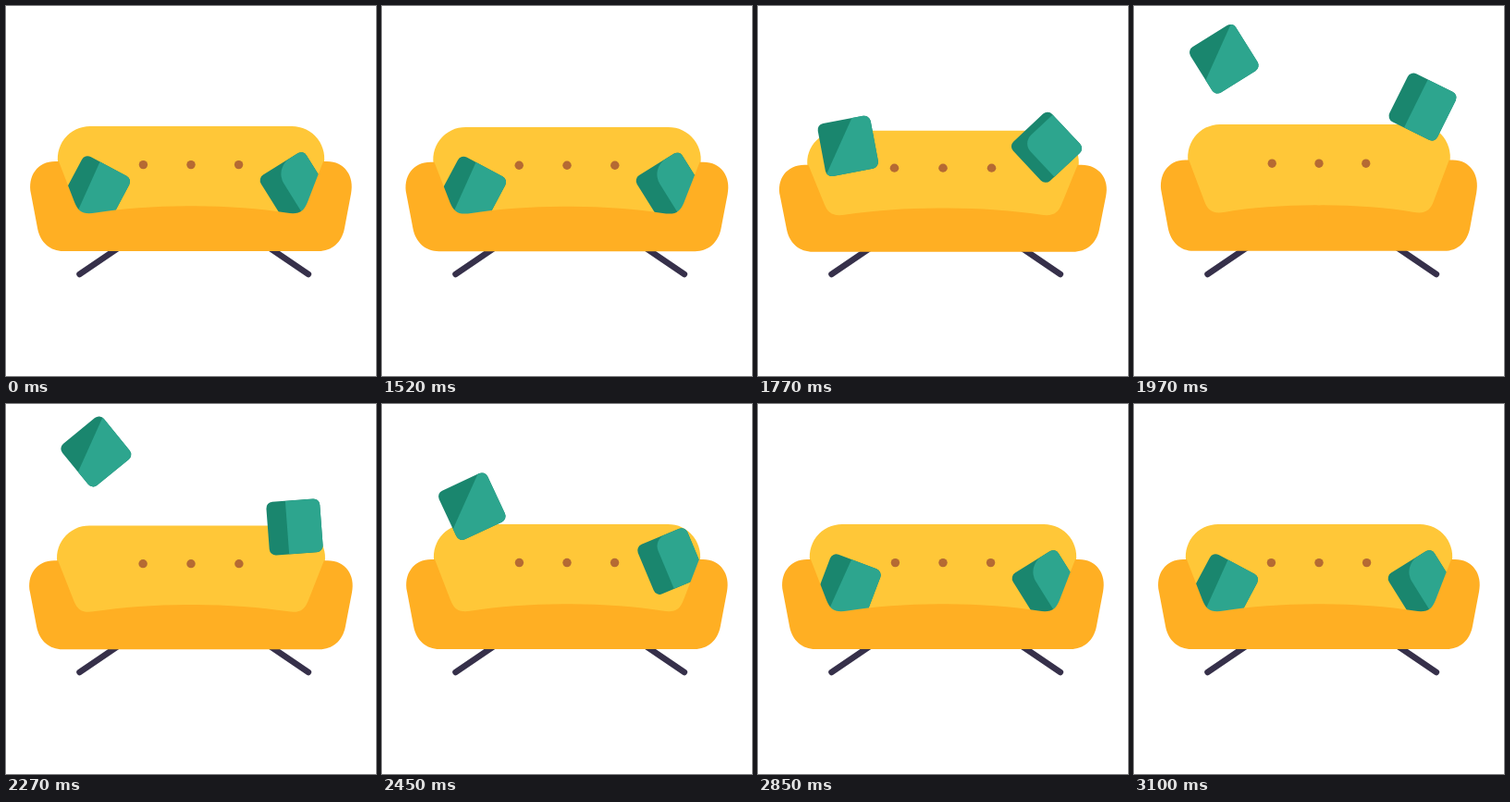
Animation, 400 px wide and 400 px high, one loop 3120 ms. Source, as an HTML page with a canvas:

```html
<!DOCTYPE html>
<html lang="en">
<head>
<meta charset="utf-8">
<title>Bouncing sofa</title>
<style>
  html, body { margin: 0; width: 100%; height: 100%; overflow: hidden; background: #fff; }
  canvas { display: block; width: 100vmin; height: 100vmin; }
</style>
</head>
<body>
<canvas id="stage" width="400" height="400"></canvas>
<script>
const LOOP = 3120, START = 1506, HOLD = 1520, SIDE = 58, HALF = SIDE / 2;
const ctx = document.getElementById('stage').getContext('2d');

const COLOR = {
  back: '#ffc738', body: '#ffaf23', button: '#b56a33',
  leg: '#36304a', light: '#2da58e', dark: '#1a866e'
};

// Left halves, mirrored to make the whole.
const backHalf = new Path2D('M200 130H91A35 35 0 0 0 57 174L80 232H200Z');
const bodyHalf = new Path2D(
  'M57 168H53C34 168 23 184 27 203L34 240C37 256 48 265 62 265' +
  'H200V216.3C165 216 125 219 97 223.5C83 226 78 222 74 212Z');
const leg = new Path2D('M79.5 290L134 253');

const clamp = f => Math.min(1, Math.max(0, f));
const ramp = (t, from, to) => clamp((t - from) / (to - from));

// Squash of the sofa: 1 is fully pressed, negative is stretched.
function squash(t) {
  const press = 1700, settle = 2560;
  if (t < press) return Math.sin(ramp(t, START, press) * Math.PI / 2);
  return Math.cos(Math.PI * (t - press) / 285) * (1 - ramp(t, press, settle)) ** 1.5;
}

// Height above the seat, 0 to 1.
function hop(t, launch, apex, land, power) {
  return 1 - (1 - ramp(t, launch, apex)) ** 3 - ramp(t, apex, land) ** power;
}

function mirrored(axis, draw) {
  draw();
  ctx.save();
  ctx.transform(-1, 0, 0, 1, 2 * axis, 0);
  draw();
  ctx.restore();
}

function fillBoth(path, color) {
  ctx.fillStyle = color;
  mirrored(200, () => ctx.fill(path));
}

function withSofa(q, draw) {
  ctx.save();
  ctx.translate(200, 290);
  ctx.scale(1 + 0.029 * q, 1 - 0.035 * q - 0.013 * Math.abs(q));
  ctx.translate(-200, -290);
  draw();
  ctx.restore();
}

function cushion(x, y, turn, shade) {
  const angle = turn * Math.PI / 180;
  ctx.save();
  ctx.translate(x, y);
  ctx.rotate(angle);
  ctx.beginPath();
  ctx.roundRect(-HALF, -HALF, SIDE, SIDE, 7);
  ctx.fillStyle = COLOR.dark;
  ctx.fill();
  ctx.clip();
  ctx.fillStyle = COLOR.light;
  ctx.beginPath();
  shade(angle);
  ctx.fill();
  ctx.restore();
}

// Rolls upright, jumps, then flops back; it sits higher when upright.
function leftCushion(t, sink) {
  const roll = 1 - (1 - ramp(t, 1550, 2200)) ** 2;
  const fall = ramp(t, 2200, 2540) ** 2;
  const flop = 1 - (1 - ramp(t, 2540, 3080)) ** 2;
  const turn = 28 - 68.5 * roll + 28.5 * fall + 40 * flop;
  const lift = 7.5 * clamp((28 - turn) / 40);
  const y = 199 + sink - lift - 145 * hop(t, 1724, 2150, 2545, 3);

  // The shading edge keeps its direction while the cushion turns.
  cushion(97.3, y, turn, angle => {
    ctx.rotate(-angle);
    ctx.moveTo(13, -50);
    ctx.lineTo(80, -50);
    ctx.lineTo(80, 50);
    ctx.lineTo(-32, 50);
  });
}

// Makes a steady quarter turn in the air.
function rightCushion(t, sink) {
  const turn = 58 - 90 * ramp(t, 1662, 2542);
  const y = 195.5 + sink - 86.5 * hop(t, 1712, 1982, 2540, 2);

  // The dark band moves from the bottom side to the left one.
  cushion(312, y, turn, () => {
    const band = 21, rise = ramp(turn, 28, 58), drop = ramp(turn, -4, -32);
    ctx.roundRect(band * (1 - rise) - HALF, -HALF, 80, SIDE - band * rise,
      [20 * drop, 0, 0, 20 * rise]);
  });
}

function draw(t) {
  const q = squash(t), sink = 4 * Math.max(0, q);
  ctx.fillStyle = '#fff';
  ctx.fillRect(0, 0, 400, 400);

  ctx.strokeStyle = COLOR.leg;
  ctx.lineWidth = 6.5;
  ctx.lineCap = 'round';
  mirrored(203.2, () => ctx.stroke(leg));

  withSofa(q, () => {
    fillBoth(backHalf, COLOR.back);
    ctx.fillStyle = COLOR.button;
    for (const x of [148.4, 200, 251.6]) {
      ctx.beginPath();
      ctx.arc(x, 171.6, 4.7, 0, 2 * Math.PI);
      ctx.fill();
    }
  });

  leftCushion(t, sink);
  rightCushion(t, sink);
  withSofa(q, () => fillBoth(bodyHalf, COLOR.body));
}

function tick() {
  const t = performance.now() % LOOP;
  draw(t < HOLD ? 0 : t);
  requestAnimationFrame(tick);
}
tick();
</script>
</body>
</html>
```
